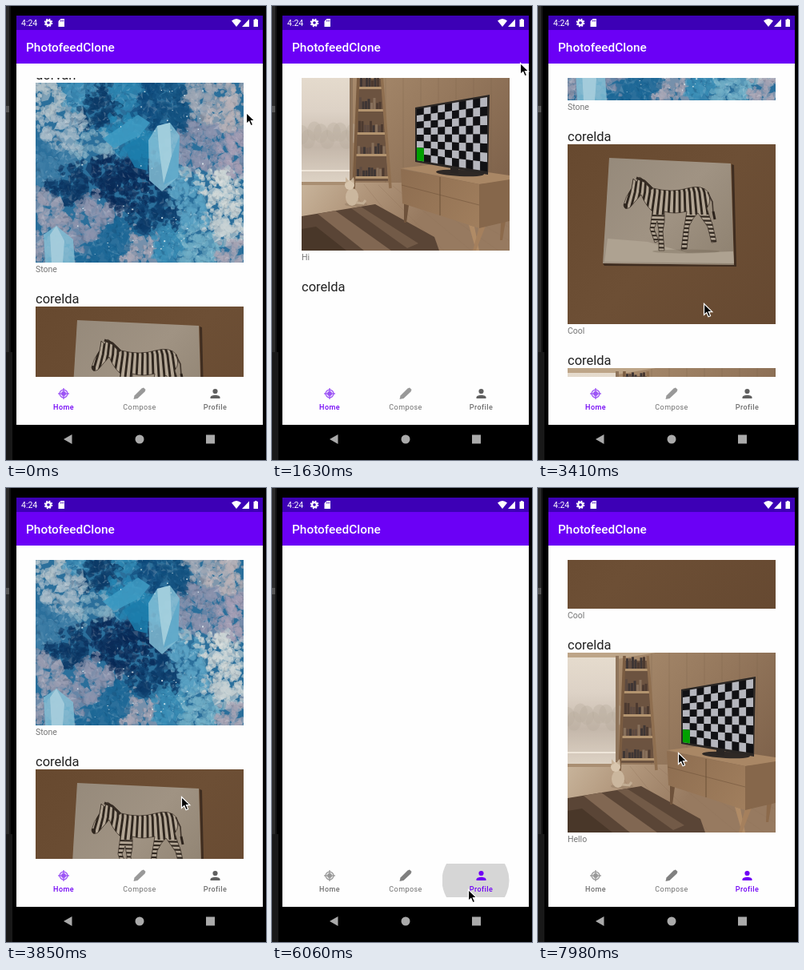
Recreate the animation shown at these times as an HTML page with a canvas. Size 325x568 px, loop 8000 ms.

```html
<!DOCTYPE html>
<html lang="en">
<head>
<meta charset="utf-8">
<title>Photo feed</title>
<style>
  html, body { margin: 0; width: 100%; height: 100%; overflow: hidden; background: #000; }
  canvas { display: block; }
</style>
</head>
<body>
<canvas id="stage" width="325" height="568"></canvas>
<script>
const LOOP = 8000, STEP = 147.75;
const PIC_W = 260, PIC_H = 225, POST_GAP = 280, FIRST_TOP = 118;
const ctx = document.getElementById('stage').getContext('2d');

// Keys are [step, value, ...], joined linearly
const homeScroll = [[0, 302], [8, 1040], [11, 1157], [12, 1158], [19, 1158], [23, 505], [30, 87], [31, 0]];
const profileScroll = [[47, 0], [54, 192]];
const cursorPath = [
  [0, 300, 133], [8, 310, 110], [10, 309, 60], [11, 310, 71], [15, 31, 300], [16, 110, 420],
  [19, 180, 430], [23, 207, 372], [30, 236, 404], [31, 201, 549], [32, 201, 552], [33, 201, 552],
  [36, 189, 553], [39, 245, 502], [44, 245, 502], [46, 196, 327], [47, 196, 327], [54, 175, 331]
];

function at(keys, step) {
  if (step <= keys[0][0]) return keys[0].slice(1);
  const i = keys.findIndex(k => k[0] >= step);
  if (i < 0) return keys[keys.length - 1].slice(1);
  const a = keys[i - 1], b = keys[i], p = (step - a[0]) / (b[0] - a[0]);
  return a.slice(1).map((v, j) => v + (b[j + 1] - v) * p);
}

let seed = 7;
const rnd = (lo = 0, hi = 1) => {
  seed = seed * 16807 % 2147483647;
  return lo + (hi - lo) * seed / 2147483647;
};

// Drawing helpers
function rect(g, fill, x, y, w, h) {
  g.fillStyle = fill;
  g.fillRect(x, y, w, h);
}
function poly(g, fill, ...p) {
  g.fillStyle = fill;
  g.beginPath();
  for (let i = 0; i < p.length; i += 2) g.lineTo(p[i], p[i + 1]);
  g.closePath();
  g.fill();
}
function oval(g, fill, x, y, rx, ry = rx, turn = 0) {
  g.fillStyle = fill;
  g.beginPath();
  g.ellipse(x, y, rx, ry, turn, 0, 7);
  g.fill();
}
function line(g, color, width, ...p) {
  g.strokeStyle = color;
  g.lineWidth = width;
  g.beginPath();
  for (let i = 0; i < p.length; i += 2) g.lineTo(p[i], p[i + 1]);
  g.stroke();
}
function fade(g, x0, y0, x1, y1, ...colors) {
  const f = g.createLinearGradient(x0, y0, x1, y1);
  colors.forEach((c, i) => f.addColorStop(i / (colors.length - 1), c));
  return f;
}
function text(str, x, y, size, color, { weight = 400, align = 'left', spacing = 0 } = {}) {
  ctx.font = `${weight} ${size}px Roboto, sans-serif`;
  ctx.letterSpacing = spacing + 'px';
  ctx.textAlign = align;
  ctx.fillStyle = color;
  ctx.fillText(str, x, y);
}
function picture(paint) {
  const c = document.createElement('canvas');
  c.width = PIC_W;
  c.height = PIC_H;
  paint(c.getContext('2d'));
  return c;
}

const dunes = picture(g => {
  rect(g, fade(g, 0, 0, 0, 82, '#f6c050', '#f5b53c', '#e9a03e'), 0, 0, 260, 83);
  rect(g, fade(g, 0, 82, 0, 225, '#a9748c', '#6a5a9c', '#3d4c9f', '#8a6cab', '#2f48a0', '#253f99', '#1f3385'), 0, 82, 260, 143);
  for (let i = 0; i < 110; i++) {
    const y = 84 + 138 * (i / 110) ** 1.5, depth = (y - 82) / 143;
    const x = rnd(-140, 200), w = rnd(80, 260), slope = (1 + 28 * depth) * rnd(-.2, 1);
    g.globalAlpha = rnd(.12, .42);
    g.strokeStyle = ['#d197ae', '#20348a', '#7a5fa8', '#2d55b0'][Math.floor(rnd(0, 4))];
    g.lineWidth = 1 + 6 * depth * rnd();
    g.beginPath();
    g.moveTo(x, y);
    g.bezierCurveTo(x + w * .3, y - 4 * depth, x + w * .6, y + slope, x + w, y + slope);
    g.stroke();
  }
  g.globalAlpha = .75;
  g.fillStyle = fade(g, 0, 140, 0, 162, '#d39bb9', '#7a62aa');
  g.beginPath();
  g.moveTo(0, 148);
  g.bezierCurveTo(80, 132, 130, 156, 260, 146);
  g.bezierCurveTo(150, 166, 70, 142, 0, 158);
  g.fill();
});

const stone = picture(g => {
  const zones = [
    [12, 15, '#b4c3ca'], [35, 55, '#a9bcc9'], [55, 12, '#3f8fb8'], [78, 28, '#0c3a68'], [112, 18, '#2d86b0'],
    [140, 30, '#0d4a7c'], [172, 25, '#12507f'], [205, 15, '#9fa7b4'], [240, 35, '#b9b3b8'], [245, 85, '#a59fb4'],
    [215, 75, '#8b93ad'], [110, 65, '#2585b2'], [75, 78, '#7fabc2'], [18, 105, '#3f7fa6'], [40, 130, '#0c3563'],
    [90, 112, '#0a2c58'], [125, 135, '#082a56'], [20, 160, '#9a9db0'], [65, 170, '#8e95ae'], [100, 200, '#1c6796'],
    [150, 165, '#0b3a69'], [160, 205, '#3b8db5'], [195, 150, '#5ba4c4'], [225, 140, '#d4dbd9'], [240, 180, '#c8d2d4'],
    [205, 205, '#73b1c8'], [130, 210, '#a9a6b6'], [250, 215, '#aaa5b4']
  ];
  rect(g, '#2b6f9b', 0, 0, 260, 225);
  for (let i = 0; i < 2600; i++) {
    const x = rnd(0, 260), y = rnd(0, 225), r = rnd(3, i < 900 ? 13 : 6), turn = rnd(0, 6);
    let best = 1e9, color;
    for (const [zx, zy, c] of zones) {
      const d = Math.hypot(zx - x, zy - y) + rnd(0, 16);
      if (d < best) [best, color] = [d, c];
    }
    const pts = [];
    for (let k = 0; k < 5; k++) {
      const a = turn + k * 1.257, q = r * rnd(.5, 1);
      pts.push(x + q * Math.cos(a), y + q * Math.sin(a));
    }
    g.globalAlpha = .6;
    poly(g, color, ...pts);
    g.globalAlpha = rnd(0, .2);
    poly(g, rnd() < .5 ? '#fff' : '#032448', ...pts.slice(0, 6));
  }
  g.globalAlpha = .85;
  poly(g, '#1c7dac', 110, 80, 130, 68, 142, 78, 140, 110, 124, 106);
  poly(g, '#3f9cc4', 84, 70, 128, 40, 143, 50, 130, 66, 98, 82);
  poly(g, '#83bfd6', 141, 72, 152, 54, 168, 50, 180, 66, 178, 118, 158, 136, 142, 122);
  poly(g, '#a9d3e0', 152, 54, 168, 50, 170, 92, 160, 126, 154, 80);
  poly(g, '#5fa9c9', 170, 92, 180, 66, 178, 118, 160, 128);
  poly(g, '#7fbcd4', 10, 190, 26, 179, 47, 196, 49, 225, 12, 225);
  poly(g, '#a9cfdd', 18, 190, 26, 179, 36, 198, 34, 225, 20, 225);
  for (let i = 0; i < 60; i++) rect(g, '#e6f1f3', rnd(50, 210), rnd(5, 220), rnd(.5, 2.2), rnd(.5, 2));
});

const zebra = picture(g => {
  rect(g, fade(g, 0, 0, 260, 225, '#67492f', '#6d4f35', '#664931'), 0, 0, 260, 225);
  poly(g, '#3f2d20', 205, 25, 208, 26, 211, 153, 46, 152, 44, 149, 208, 151);
  poly(g, fade(g, 50, 20, 200, 150, '#968a7b', '#a09383', '#8f8271'), 52, 17, 204, 24, 208, 151, 44, 149);
  poly(g, '#aea291', 50, 118, 100, 122, 150, 136, 207, 134, 208, 149, 46, 147);

  g.save();
  const body = new Path2D('M70 76Q72 66 80 55L82 43L86 47L90 41Q98 46 107 55Q130 61 150 55Q168 50 176 60Q181 70 174 80' +
    'Q177 90 181 100L186 122L180 123L175 103L163 86Q157 91 152 102L149 131L142 132L145 108L149 84Q133 88 121 84' +
    'Q122 98 119 109L121 133L114 133L114 108L112 96L108 106L114 121L109 123L103 106L106 84Q97 76 92 63L78 79Q71 83 70 76Z');
  g.fillStyle = '#b3a695';
  g.fill(body);
  g.strokeStyle = '#40352c';
  g.lineWidth = .8;
  g.stroke(body);
  g.clip(body);
  for (let x = 76; x < 184; x += 6.2) {
    const lean = (x - 122) * .13;
    line(g, '#30271f', 2.9, x - lean, 38, x + 2, 60, x + lean, 88);
  }
  for (let y = 89; y < 130; y += 5) line(g, '#30271f', 2.1, 100, y, 190, y + 2);
  oval(g, '#30271f', 71, 78, 4, 4);
  g.restore();
  line(g, '#352b23', 3, 86, 42, 96, 46, 106, 56);
  line(g, '#40352c', 1.6, 175, 60, 181, 72, 182, 86);
  line(g, '#2c231c', 3, 182, 84, 184, 94);
  g.globalAlpha = .35;
  oval(g, '#6e6152', 148, 134, 42, 2.5);
});

const room = picture(g => {
  rect(g, fade(g, 60, 0, 260, 150, '#a88b6d', '#94775c', '#7c6049'), 0, 0, 260, 225);
  for (let x = 105; x < 260; x += 22) line(g, '#7b604a55', 1, x, 0, x, 150);
  poly(g, '#bda588', 0, 0, 110, 0, 62, 8, 0, 6);
  poly(g, fade(g, 0, 140, 120, 225, '#c8b49b', '#b0957a', '#977a60'), 0, 140, 125, 140, 260, 180, 260, 225, 0, 225);
  for (let i = 0; i < 8; i++) line(g, '#8d735a66', .8, 60 + i * 18, 141 + i, 110 + i * 34, 225);

  rect(g, fade(g, 0, 6, 0, 140, '#e5dbcd', '#ddd2c6', '#c4b7aa', '#ded3c5'), 0, 6, 61, 134);
  for (let i = 0; i < 9; i++) oval(g, '#b8aa9c55', i * 8, 80 + 6 * Math.sin(i * 2), 9, 12);
  rect(g, '#8e745b', 60, 4, 4, 140);
  rect(g, '#efe6da', 0, 124, 60, 2);
  rect(g, '#a98e72', 0, 139, 64, 4);

  poly(g, '#6c5340', 71, 10, 100, 10, 108, 138, 66, 138);
  [20, 48, 77, 104, 132].forEach((y, i) => {
    const left = 70 - i, right = 101 + i * 2;
    for (let x = left + 3; x < right - 5; x += 3.5) {
      const h = rnd(7, 15);
      rect(g, ['#4c3a30', '#87705b', '#5d4a40', '#3f3634'][Math.floor(rnd(0, 4))], x, y - h, 3, h);
    }
    rect(g, '#b3946f', left, y, right - left, 3);
  });
  line(g, '#7a5c41', 3.5, 71, 4, 65, 148);
  line(g, '#8f6f50', 3.5, 100, 4, 111, 147);

  poly(g, '#5a4536', 0, 182, 92, 167, 166, 208, 172, 225, 0, 225);
  poly(g, '#816752', 20, 179, 42, 175, 112, 225, 78, 225);
  poly(g, '#725a47', 62, 172, 74, 170, 146, 216, 132, 222);
  poly(g, '#493729', 0, 198, 18, 195, 56, 225, 0, 225);

  poly(g, '#6e523b', 128, 165, 134, 168, 131, 190, 128, 190);
  poly(g, '#b08b66', 209, 193, 216, 195, 222, 225, 218, 225);
  poly(g, '#a5805d', 222, 195, 230, 194, 218, 225, 214, 225);
  poly(g, '#8c6a4b', 249, 190, 255, 188, 251, 212, 248, 212);
  poly(g, '#a98765', 124, 122, 165, 117, 260, 131, 260, 138, 222, 142);
  poly(g, fade(g, 124, 122, 222, 190, '#8d6d50', '#a07e5d'), 124, 123, 222, 142, 222, 197, 126, 166);
  poly(g, '#86674b', 222, 142, 260, 136, 260, 188, 222, 197);
  line(g, '#6d5239', 1, 173, 133, 173, 181);
  line(g, '#6d523988', 1, 125, 143, 222, 168);

  oval(g, '#2e2825', 198, 128, 30, 4, .05);
  poly(g, '#2a2523', 186, 117, 196, 119, 196, 129, 186, 128);
  poly(g, '#2a2624', 142, 46, 235, 30, 233, 130, 142, 114);
  const spot = (u, v) => {
    const top = 48 - 15 * u, bottom = 112 + 14 * u;
    return [144 + 88 * u, top + (bottom - top) * v];
  };
  const cell = (fill, c, r, h = 1) => poly(g, fill, ...spot(c / 10, r / 8), ...spot((c + 1) / 10, r / 8),
    ...spot((c + 1) / 10, (r + h) / 8), ...spot(c / 10, (r + h) / 8));
  for (let c = 0; c < 10; c++)
    for (let r = 0; r < 8; r++) cell((c + r) % 2 ? '#b5b6bd' : '#111114', c, r);
  cell('#00a000', 0, 6, 2);

  oval(g, '#8a725c66', 68, 167, 14, 3);
  oval(g, '#cbb79e', 63, 158, 8, 11);
  oval(g, '#d8c6ae', 60, 143, 6, 6);
  poly(g, '#c8b399', 55, 141, 55, 133, 59, 138);
  poly(g, '#c8b399', 61, 138, 65, 133, 66, 141);
  line(g, '#c2ad93', 3, 68, 165, 77, 166, 80, 162);
});

const sunflower = picture(g => {
  rect(g, fade(g, 0, 0, 0, 120, '#3a6ea9', '#4c84bb', '#3c6e9a'), 0, 0, 260, 225);
  for (let i = 0; i < 70; i++) {
    const x = rnd(-10, 120), y = rnd(48, 225);
    oval(g, ['#2f4d1c', '#4c7527', '#6b9138', '#203915'][i % 4], x, y, rnd(8, 22), rnd(4, 11), rnd(0, 3));
  }
  const petals = (x, y, inner, outer, count, half, colors) => {
    for (let i = 0; i < count; i++) {
      const turn = i * 2.399963, len = outer * rnd(.84, 1.03);
      g.save();
      g.translate(x, y);
      g.rotate(turn);
      g.fillStyle = colors[i % colors.length];
      g.beginPath();
      g.moveTo(inner, -half * .5);
      g.quadraticCurveTo(len * .7, -half * 1.5, len, 0);
      g.quadraticCurveTo(len * .7, half * 1.5, inner, half * .5);
      g.fill();
      line(g, '#c9880066', .8, inner, 0, len * .9, 0);
      g.restore();
    }
  };
  petals(51, 22, 8, 40, 26, 6, ['#e6a800', '#f8ca10', '#d99600']);
  oval(g, '#4e2f10', 49, 22, 16, 13);
  oval(g, '#6d4516', 49, 20, 9, 7);
  petals(198, 125, 30, 132, 44, 12, ['#f0ad00', '#ffd010', '#e59c00', '#ffc400', '#ffdc30']);
  oval(g, '#4a2608', 198, 125, 54);
  for (let i = 0; i < 650; i++) {
    const a = i * 2.399963, r = 2.15 * Math.sqrt(i);
    oval(g, ['#2a1507', '#7a430e', '#a9630f'][i % 3], 198 + r * Math.cos(a), 125 + r * Math.sin(a), 1.3);
  }
});

const post = (user, image, caption) => ({ user, image, caption });
const profilePosts = [
  post('corelda', zebra, 'Cool'), post('corelda', room, 'Hello'),
  post('corelda', room, 'Hi'), post('corelda', sunflower, '')
];
const homePosts = [post('dorvan', dunes, 'Background'), post('dorvan', stone, 'Stone'), ...profilePosts];

function drawFeed(posts, scroll, loaded) {
  ctx.save();
  ctx.beginPath();
  ctx.rect(37, 90, PIC_W, 374);
  ctx.clip();
  posts.forEach(({ user, image, caption }, i) => {
    const top = Math.round(FIRST_TOP + i * POST_GAP - scroll);
    if (top > 490 || top < -250) return;
    text(user, 37, top - 4, 16.5, '#212121');
    if (loaded(image)) ctx.drawImage(image, 37, top);
    text(caption, 37, top + 237, 10.5, '#757575');
  });
  ctx.restore();
}

function drawFrame() {
  rect(ctx, '#000', 0, 0, 325, 568);
  rect(ctx, '#2b2b2b', 0, 0, 4, 568);
  rect(ctx, '#131313', 4, 0, 2, 568);
  rect(ctx, '#555', 0, 125, 4, 8);
  rect(ctx, '#191919', 0, 433, 8, 135);
  rect(ctx, '#fefefe', 13, 72, 308, 452);
  rect(ctx, '#3d00b6', 13, 12, 308, 18);
  rect(ctx, '#6b00f6', 13, 30, 308, 42);
  text('PhotofeedClone', 25, 57, 15.4, '#fff', { weight: 500 });

  text('4:24', 19, 25, 10.5, '#fff');
  ctx.setLineDash([2, 1.53]);
  ctx.strokeStyle = '#fff';
  ctx.lineWidth = 1.6;
  ctx.beginPath();
  ctx.arc(53, 21, 4.5, 0, 2 * Math.PI);
  ctx.stroke();
  ctx.setLineDash([]);
  ctx.lineWidth = 2.2;
  ctx.beginPath();
  ctx.arc(53, 21, 2.9, 0, 7);
  ctx.stroke();
  poly(ctx, '#fff', 68.5, 16, 73, 16, 73, 26, 65.5, 26, 65.5, 19);
  for (const x of [68, 69.7, 71.4]) rect(ctx, '#3d00b6', x, 17.5, .8, 2);
  ctx.fillStyle = '#fff';
  ctx.beginPath();
  ctx.moveTo(288, 26);
  ctx.lineTo(282, 18.5);
  ctx.quadraticCurveTo(288, 13.5, 294, 18.5);
  ctx.fill();
  poly(ctx, '#fff', 295, 26, 304, 26, 304, 16.5);
  rect(ctx, '#fff', 309.5, 17, 5.5, 9);
  rect(ctx, '#fff', 311, 16, 2.5, 1);

  poly(ctx, '#aaa', 72, 542, 82.5, 536, 82.5, 548);
  oval(ctx, '#aaa', 167, 542, 5.5);
  rect(ctx, '#aaa', 250, 536.5, 11, 11);
}

function drawTabs(onProfile) {
  const active = '#7000f5', idle = '#6e6e6e';
  const tint = onProfile ? '#9a9a9a' : '#9d55f6';
  ctx.strokeStyle = tint;
  ctx.lineWidth = 1.5;
  ctx.beginPath();
  ctx.arc(72, 485, 4.8, 0, 7);
  ctx.stroke();
  oval(ctx, tint, 72, 485, 3);
  line(ctx, tint, 1.3, 72, 478, 72, 492);
  line(ctx, tint, 1.3, 65, 485, 79, 485);

  poly(ctx, onProfile ? '#808080' : '#999', 159.5, 492, 160.5, 487.5, 169.5, 478.5, 172, 477.5, 174.5, 480, 173.5, 482.5, 164.5, 491);

  const person = onProfile ? active : '#606060';
  oval(ctx, person, 261.5, 482, 3.1);
  ctx.beginPath();
  ctx.moveTo(255.5, 491);
  ctx.lineTo(255.5, 489.5);
  ctx.bezierCurveTo(256, 485.7, 267, 485.7, 267.5, 489.5);
  ctx.lineTo(267.5, 491);
  ctx.fill();

  const style = { align: 'center', spacing: .4, weight: 500 };
  text('Home', 72, 504.5, 9, onProfile ? idle : active, style);
  text('Compose', 167, 504.5, 9, idle, { ...style, weight: 400 });
  text('Profile', 261.5, 504.5, 9, onProfile ? active : idle, style);
}

function drawRipple(x, radius, color) {
  ctx.save();
  ctx.beginPath();
  ctx.rect(213, 470, 96, 42);
  ctx.clip();
  oval(ctx, color, x, 491, radius);
  ctx.restore();
}

function drawCursor(x, y) {
  ctx.save();
  ctx.translate(Math.round(x), Math.round(y));
  const arrow = new Path2D('M.5 .5V14.5L3.8 11.5L6 16.7L8.6 15.6L6.4 10.6H10.8Z');
  ctx.fillStyle = '#000';
  ctx.strokeStyle = '#fff';
  ctx.lineWidth = 1.2;
  ctx.fill(arrow);
  ctx.stroke(arrow);
  ctx.restore();
}

function draw(now) {
  const step = Math.floor(now % LOOP / STEP);
  const onProfile = step >= 41;
  drawFrame();
  if (!onProfile) drawFeed(homePosts, at(homeScroll, step)[0], pic => pic !== sunflower || step > 11);
  else if (step > 41) drawFeed(profilePosts, at(profileScroll, step)[0], () => step > 42);
  if (step === 41) drawRipple(254.5, 42, '#d6d6d6');
  if (step === 42) drawRipple(261.5, 47.5, '#e4e4e4');
  drawTabs(onProfile);
  drawCursor(...at(cursorPath, step));
  requestAnimationFrame(draw);
}
requestAnimationFrame(draw);
</script>
</body>
</html>
```
